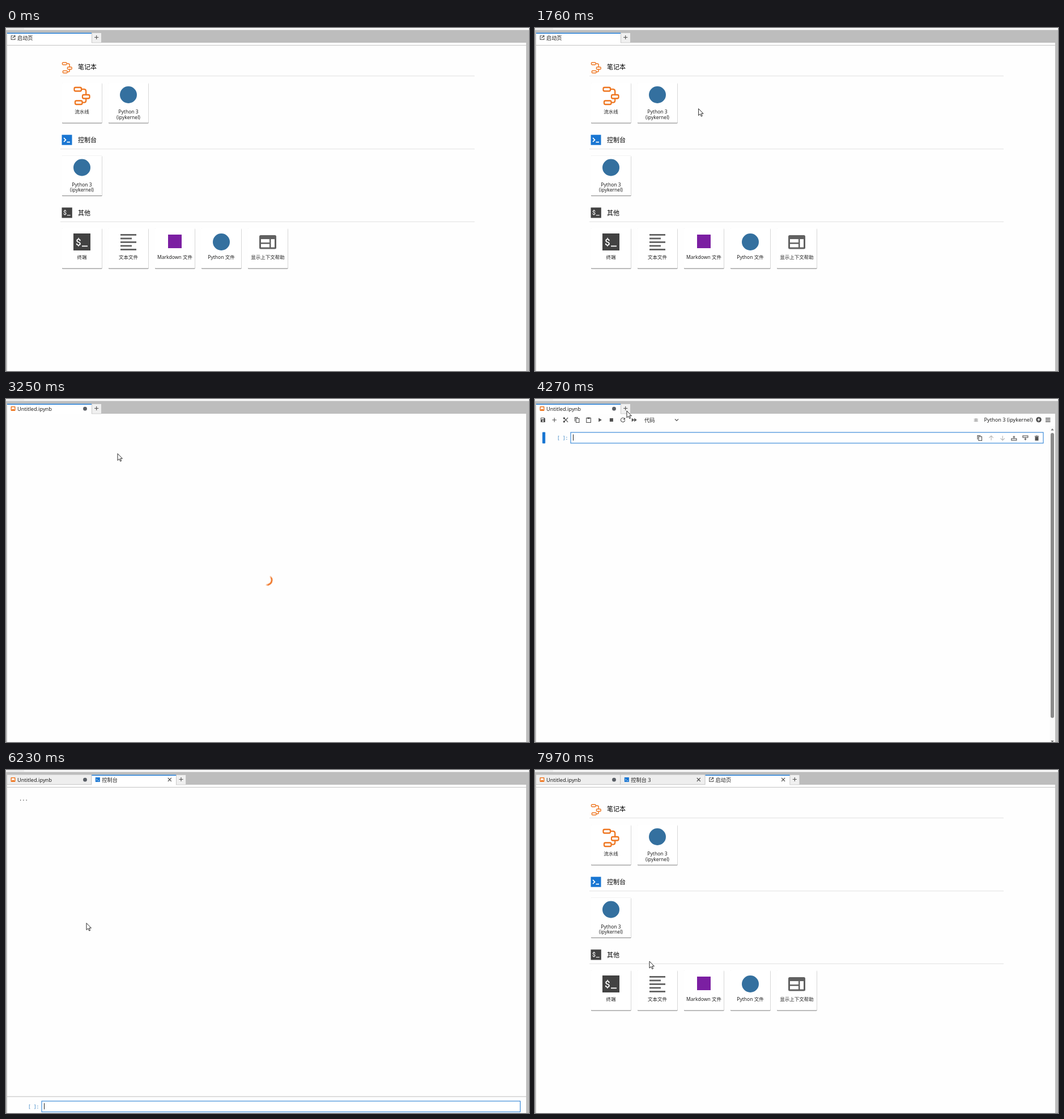
These frames come from a looping animation (923x606 px, 8000 ms). An HTML page:

```html
<!DOCTYPE html>
<html lang="zh-CN">
<head>
<meta charset="utf-8">
<style>
html, body { margin: 0; width: 100%; height: 100%; overflow: hidden; background: #fff; }
svg { display: block; }
text { font-family: 'Noto Sans', 'Noto Sans CJK SC', sans-serif; font-size: 9.2px; fill: #212121; }
.mono { font-family: 'DejaVu Sans Mono', monospace; font-size: 8px; }
.shell { font: 500 17px Roboto, sans-serif; fill: #fff; }
.head { font-size: 11px; fill: #000; }
.label { font-size: 8.5px; text-anchor: middle; }
.line { fill: none; stroke: #505050; stroke-width: 1.1; }
</style>
</head>
<body>
<svg id="stage" width="923" height="606" viewBox="0 0 923 606"></svg>
<script>
const BLUE = '#1976d2', DARK = '#505050', GREY = '#bdbdbd', ORANGE = '#ee7620';
const LOOP = 8000, TAB = 149.3;

const rect = (x, y, w, h, fill, more = '') =>
  `<rect x="${x}" y="${y}" width="${w}" height="${h}" fill="${fill}" ${more}/>`;
const text = (x, y, s, cls = '', more = '') => `<text x="${x}" y="${y}" class="${cls}" ${more}>${s}</text>`;
const path = (d, more = 'class="line"') => `<path d="${d}" ${more}/>`;
const solid = (d, fill = DARK) => path(d, `fill="${fill}"`);
const dot = (x, y, r, fill) => `<circle cx="${x}" cy="${y}" r="${r}" fill="${fill}"/>`;
const at = (x, y, body, scale = 1) => `<g transform="translate(${x} ${y}) scale(${scale})">${body}</g>`;

// Icons, each drawn from its own top left corner
const pipeline = `<g fill="none" stroke="${ORANGE}" stroke-width="2.3">` +
  [[1.5, 2], [16, 15], [3, 25.5]].map(([x, y]) => rect(x, y, 12.5, 6.5, 'none', 'rx="2.2"')).join('') +
  path('M14 5.2H18.5Q22.2 5.2 22.2 9V15M22.2 21.5V25Q22.2 28.7 18.5 28.7H15.5', '') + '</g>';
const consoleIcon = rect(0, 0, 18, 18, BLUE) +
  path('M3.5 5.5l3.5 3.5-3.5 3.5M9 13h5.5', 'fill="none" stroke="#fff" stroke-width="1.7"');
const shellIcon = rect(0, 0, 30, 30, '#424242') + text(4, 21, '$', 'shell') + rect(15, 21.5, 10, 1.8, '#fff');
const python = dot(15, 15, 15, '#34709f');
const textIcon = [0, 1, 2, 3, 4].map(i => rect(1, 1 + i * 6.5, i % 2 ? 20 : 28, 2.8, '#616161')).join('');
const markdown = rect(3, 2, 24, 24, '#7b1fa2');
const helpIcon = rect(0, 3, 30, 24.5, '#616161', 'rx="2.5"') + rect(3, 10, 15, 6, '#fff') +
  rect(3, 18.5, 15, 6, '#fff') + rect(20.5, 10, 6.5, 14.5, '#fff');
const launchIcon = path('M4 .8H.7V7.5H7.4V4.5M5 .6H7.5V3.2M7.3 .8L3 5');
const bookIcon = rect(0, 0, 8, 8, ORANGE, 'rx="1"') + solid('M1.5 1.5H6.5V6L4 4.2 1.5 6Z', '#fff');

const CARDS = [
  [0, 97, pipeline, '流水线'], [1, 97, python, 'Python 3', '(ipykernel)'],
  [0, 225.5, python, 'Python 3', '(ipykernel)'],
  [0, 354, shellIcon, '终端'], [1, 354, textIcon, '文本文件'], [2, 354, markdown, 'Markdown 文件'],
  [3, 354, python, 'Python 文件'], [4, 354, helpIcon, '显示上下文帮助']
].map(([col, y, icon, ...label]) => ({ x: 99 + col * 82, y, icon, label }));

const card = ({ x, y, icon, label }) =>
  rect(x, y, 70.5, 70.5, '#fff', 'class="card" rx="1"') +
  at(x + 20, y + (icon === pipeline || label[1] ? 6 : 9), icon) +
  label.map((s, i) => text(x + 35, y + 54.3 + i * 9.2, s, 'label')).join('');

const section = (y, icon, scale, title) =>
  at(98.5, y - 9.3, icon, scale) + text(127, y + 4, title, 'head') + rect(96, y + 15.3, 731, 1, '#e0e0e0');

const topLine = rect(2, 30, 916, 1, '#c4c4c4');
const launcher = topLine + section(69, pipeline, .62, '笔记本') + section(198, consoleIcon, 1, '控制台') +
  section(326.5, shellIcon, .61, '其他') + CARDS.map(card).join('');

const input = (y, right) => text(39, y + 13, '[ ]:', 'mono', 'style="fill:#307fc1"') +
  rect(63, y + .5, right - 63, 19, '#fff', `stroke="${BLUE}"`) + rect(67, y + 4, 1, 11, '#222');

const copyIcon = path('M3 2.5H8.5V9.5H3ZM1 7.5V.6H6.5');
const arrow = path('M5 9V1M1.3 4.7L5 1 8.7 4.7', 'fill="none" stroke="#b5b5b5" stroke-width="1.1"');
const insert = rect(.5, 6, 9, 3, 'none', 'class="line"') + path('M5 6V1M3 3H7');
const tools = [
  solid('M1 1H7.5L9 2.5V9H1ZM2 2V4H6.5V2ZM5 5.5A1.3 1.3 0 1 0 5.1 5.5Z'),
  path('M5 1.2V8.8M1.2 5H8.8'),
  path('M1.5 1L8.8 8.8M8.8 1L1.5 8.8') + dot(2, 2, 1.7, DARK) + dot(2, 8, 1.7, DARK),
  copyIcon,
  rect(1.2, 1.5, 7.6, 8, 'none', 'class="line"') + rect(3, .5, 4, 2.6, DARK),
  solid('M2.5 1.5L8 5 2.5 8.5Z'),
  rect(2, 2, 6, 6, DARK),
  path('M7.9 2.6A3.7 3.7 0 1 0 8.7 5.6') + solid('M9 .8V4.4H5.4Z'),
  solid('M.5 1.7L5 5 .5 8.3ZM5 1.7L9.5 5 5 8.3Z')
].map((icon, i) => at(9 + i * 20.15, 32, icon)).join('');
const cellTools = [
  copyIcon, arrow, `<g transform="rotate(180 5 5)">${arrow}</g>`, insert,
  `<g transform="rotate(180 5 5)">${insert}</g>`,
  solid('M2 3H8V9.5H2ZM1.3 1.3H3.8L4.3 .6H5.7L6.2 1.3H8.7V2.4H1.3Z')
].map((icon, i) => at(780 + i * 20.1, 64, icon)).join('');

const bug = at(774, 32.5, '<g opacity=".4">' + rect(2, 1.5, 4.5, 6.5, '#616161', 'rx="2"') +
  path('M.5 2.7H8M.5 4.8H8M.5 6.9H8') + '</g>');
const notebook = tools + text(193, 40.5, '代码') + path('M247 35.5L250 38.5 253 35.5') + bug +
  text(792.5, 40.3, 'Python 3 (ipykernel)') + dot(889, 36.5, 4.8, DARK) +
  solid('M890 32.8L886.5 37.2H888.7L888 40.2 891.5 35.8H889.3Z', '#fff') +
  path('M901 34H909.5M901 37H909.5M901 40H909.5', `stroke="${DARK}" stroke-width="1.4"`) +
  rect(13, 58.5, 5.2, 20, BLUE, 'rx="1"') + input(58.5, 897) + cellTools +
  rect(908.5, 48, 9.5, 558, '#fafafa') + rect(910, 60, 6, 503.5, '#8a8a8a', 'rx="3"') +
  solid('M910.3 55.5L913 52 915.7 55.5ZM910.3 603.5L913 607 915.7 603.5Z', '#777');

const consolePage = topLine + text(23, 53.5, '...', 'mono', 'style="font-size:8.8px"') +
  rect(2, 576.5, 916, 1, GREY) + input(584.5, 907.5);

const book = { icon: bookIcon, title: 'Untitled.ipynb', dirty: true };
const launch = { icon: launchIcon, title: '启动页' };
const term = title => ({ icon: at(0, 0, consoleIcon, .45), title });

// Start time, page, tabs
const SCENES = [
  [0, 'launcher', launch],
  [2870, 'notebook', book],
  [4400, 'launcher', book, launch],
  [6160, 'console', book, term('控制台')],
  [6490, 'console', book, term('控制台 3')],
  [7350, 'launcher', book, term('控制台 3'), launch]
];

const drawTabs = list => list.map(({ icon, title, dirty }, i) => {
  const x = 2 + i * TAB, active = i === list.length - 1;
  return rect(x, 8.5, TAB, 17.5, active ? '#fff' : '#eee') +
    (active ? rect(x, 8.5, TAB, 1.5, BLUE) : rect(x, 25, TAB, 1, '#c8c8c8') + rect(x + TAB - 1, 8, 1, 18, GREY)) +
    at(x + 6.5, 13, icon) + text(x + 18, 20.7, title) +
    (dirty ? dot(139.5, 17.2, 3.4, '#5a5f66') : i ? at(x + 134.5, 14, path('M0 0L6 6M6 0L0 6')) : '');
}).join('') + at(2 + list.length * TAB, 8,
  rect(0, .5, 17, 17.5, '#f0f0f0', 'stroke="#b5b5b5" stroke-width=".6"') + path('M4.8 8.5H12M8.4 4.9V12.1'));

const pointer = 'fill="#fff" stroke="#111" stroke-width=".9" stroke-linejoin="round"';
stage.innerHTML = `<defs><linearGradient id="fade">
  <stop offset=".18" stop-color="#f08038"/><stop offset=".46" stop-color="#f08038" stop-opacity="0"/>
  </linearGradient></defs>` +
  rect(0, 0, 923, 606, GREY) + rect(0, 0, 923, 3.5, '#f8f8f8') + rect(0, 0, 32, 3, '#eee') +
  rect(2, 26, 916, 580, '#fefefe') + '<g id="tabs"></g>' +
  `<g id="launcher">${launcher}</g><g id="notebook">${notebook}</g><g id="console">${consolePage}</g>
  <circle id="spinner" cx="461" cy="320" r="8.2" fill="none" stroke="url(#fade)" stroke-width="3"/>
  <g id="cursor">` + path('M0 0V12L2.8 9.4 4.8 13.6 6.6 12.8 4.7 8.7H8.4Z', pointer) +
  path('M-1.2 1Q0-.6 1.2 1V6Q2.4 4.8 3.5 6.2 4.8 5.4 5.7 6.8 7.2 6.2 7.6 8V11.5Q7 14 6 16.5H-1' +
    'Q-1.5 14.5-3 12.5L-5 9.5Q-5 7.6-3.2 8.2L-1.2 10Z', pointer) + '</g>';

const get = id => document.getElementById(id);
const show = (el, on) => { el.style.display = on ? '' : 'none'; };
const cursor = get('cursor'), [arrowShape, handShape] = cursor.children;
const cardRects = [...document.querySelectorAll('.card')];

// Time, x, y of the mouse
const MOUSE = [
  [390, 880, 592], [950, 485, 104], [1150, 485, 104], [1280, 436, 119], [1480, 436, 119],
  [1760, 289, 142.5], [2030, 186, 155], [2430, 186, 155], [2800, 197, 104], [3170, 197, 96.5],
  [4200, 197, 96.5], [4270, 162, 21], [4400, 162, 21], [4870, 143, 255.5], [5010, 143, 255.5],
  [5080, 142, 262], [6160, 142, 262], [6230, 142, 270.5], [6490, 142, 270.5], [7150, 305, 19],
  [7690, 305, 19], [7760, 270, 110], [7830, 190, 240], [7900, 119, 325], [7970, 202, 338], [LOOP, 202, 338]
];

function mouseAt(t) {
  const i = MOUSE.findIndex(k => k[0] > t), [t0, x0, y0] = MOUSE[i - 1], [t1, x1, y1] = MOUSE[i];
  const k = (t - t0) / (t1 - t0);
  return [x0 + (x1 - x0) * k, y0 + (y1 - y0) * k];
}

function shade(i, t, start, end) {
  const k = t < end ? Math.max(0, Math.min(1, (t - start) / 200)) : 0;
  cardRects[i].style.filter =
    `drop-shadow(0 ${1 + k}px ${.7 + 1.4 * k}px rgba(0,0,0,.45)) drop-shadow(0 0 ${.5 + k}px rgba(0,0,0,.2))`;
}
cardRects.forEach((_, i) => shade(i, 0, 1, 0));

let current;
function draw(now) {
  const t = now % LOOP;
  const scene = SCENES.findLast(s => s[0] <= t), [, page, ...tabList] = scene;
  if (scene !== current) {
    current = scene;
    get('tabs').innerHTML = drawTabs(tabList);
    show(get('launcher'), page === 'launcher');
    show(get('console'), page === 'console');
  }
  const loading = page === 'notebook' && t < 3600;
  show(get('notebook'), page === 'notebook' && !loading);
  show(get('spinner'), loading);
  get('spinner').setAttribute('transform', `rotate(${205 + (t - 3250) * .36} 461 320)`);

  shade(1, t, 2430, 2870);
  shade(2, t, 4870, 6160);

  show(cursor, t >= 390);
  if (t >= 390) {
    const [x, y] = mouseAt(t);
    const over = page === 'launcher' &&
      CARDS.some(c => x > c.x && x < c.x + 70 && y > c.y && y < c.y + 70);
    show(arrowShape, !over);
    show(handShape, over);
    cursor.setAttribute('transform', `translate(${x} ${y})`);
  }
  requestAnimationFrame(draw);
}
requestAnimationFrame(draw);
</script>
</body>
</html>
```
